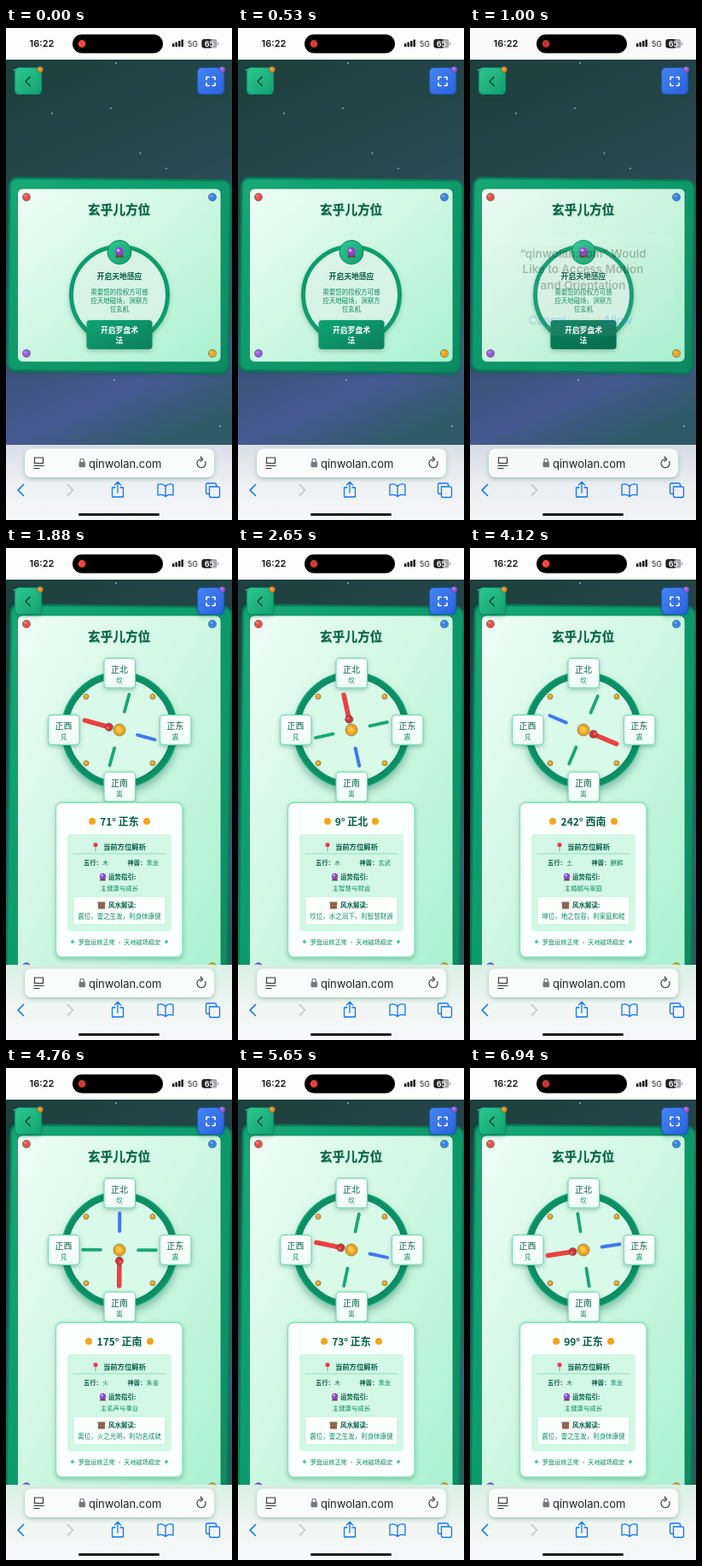
Recreate the animation shown at these times as an HTML page. Size 265 px wide and 576 px high, loop 7.94 s.

```html
<!DOCTYPE html>
<html lang="zh">
<head>
<meta charset="utf-8">
<style>
html, body { margin: 0; width: 100%; height: 100%; overflow: hidden; background: #fdfdfd; }
svg { display: block; width: 100vw; height: 100vh; }
text { font-family: "Noto Sans CJK SC", "Noto Sans CJK", sans-serif; text-anchor: middle; dominant-baseline: central; }
.ui { font-family: Inter, sans-serif; }
.b { font-weight: 700; }
.m { font-weight: 500; }
.l { text-anchor: start; }
.line { fill: none; stroke-linecap: round; stroke-linejoin: round; }
</style>
</head>
<body>
<svg id="stage" viewBox="0 0 265 576" preserveAspectRatio="none">
<defs>
  <linearGradient id="sky" x1=".35" y1="0" x2=".6" y2="1">
    <stop offset="0" stop-color="#1e4140"/><stop offset=".35" stop-color="#28494f"/>
    <stop offset=".6" stop-color="#36506f"/><stop offset=".84" stop-color="#465a92"/><stop offset="1" stop-color="#2f5b68"/>
  </linearGradient>
  <linearGradient id="frame" x1="0" y1="0" x2="1" y2="1">
    <stop offset="0" stop-color="#13a976"/><stop offset="1" stop-color="#088b61"/>
  </linearGradient>
  <linearGradient id="mint" x1="0" y1="0" x2="1" y2="1">
    <stop offset="0" stop-color="#effdf6"/><stop offset=".5" stop-color="#cdf7e1"/><stop offset="1" stop-color="#a9f1d0"/>
  </linearGradient>
  <linearGradient id="tile" x1="0" y1="0" x2="0" y2="1">
    <stop offset="0" stop-color="#fff"/><stop offset="1" stop-color="#effdf6"/>
  </linearGradient>
  <linearGradient id="green" x1="0" y1="0" x2="1" y2="1">
    <stop offset="0" stop-color="#2fc892"/><stop offset="1" stop-color="#12a06f"/>
  </linearGradient>
  <linearGradient id="deep" x1="0" y1="0" x2="1" y2="1">
    <stop offset="0" stop-color="#12a574"/><stop offset="1" stop-color="#0b7e5b"/>
  </linearGradient>
  <linearGradient id="blue" x1="0" y1="0" x2="1" y2="1">
    <stop offset="0" stop-color="#4586f3"/><stop offset="1" stop-color="#2860dc"/>
  </linearGradient>
  <linearGradient id="barA" x1="0" y1="0" x2="0" y2="1">
    <stop offset="0" stop-color="#d9dfe7"/><stop offset=".55" stop-color="#eef1f5"/><stop offset="1" stop-color="#f5f7f9"/>
  </linearGradient>
  <linearGradient id="barB" x1="0" y1="0" x2="0" y2="1">
    <stop offset="0" stop-color="#d8efe5"/><stop offset=".55" stop-color="#f0f6f4"/><stop offset="1" stop-color="#f6f8f9"/>
  </linearGradient>
  <filter id="soft" x="-30%" y="-30%" width="160%" height="170%">
    <feDropShadow dx="0" dy="2" stdDeviation="2.5" flood-color="#064e3b" flood-opacity=".3"/>
  </filter>
  <filter id="wide" x="-30%" y="-30%" width="160%" height="170%">
    <feDropShadow dx="0" dy="6" stdDeviation="5" flood-color="#0b5f46" flood-opacity=".4"/>
  </filter>
</defs>
</svg>
<script>
const svg = document.getElementById('stage');
const ink = '#065f46', leaf = '#0b8a63', orange = '#f7a31c';

const box = (x, y, w, h, r, fill, extra = '') =>
  `<rect x="${x}" y="${y}" width="${w}" height="${h}" rx="${r}" fill="${fill}" ${extra}/>`;
const dot = (x, y, r, fill, extra = '') => `<circle cx="${x}" cy="${y}" r="${r}" fill="${fill}" ${extra}/>`;
const ball = (x, y, r, fill) => dot(x, y, r, fill, 'stroke="#12604b" stroke-opacity=".55" stroke-width=".9"') +
  dot(x - r * .25, y - r * .3, r * .35, '#fff', 'opacity=".3"');
// Chinese glyphs sit slightly below the central baseline, so they are raised
const text = (x, y, size, str, fill = ink, cls = '', extra = '') =>
  `<text x="${x}" y="${cls.includes('ui') ? y : y - .7}" font-size="${size}" fill="${fill}" class="${cls}" ${extra}>${str}</text>`;
const line = (d, color, w = 1.3) => `<path class="line" d="${d}" stroke="${color}" stroke-width="${w}"/>`;
const group = (id, body) => `<g id="${id}">${body}</g>`;

const orb = (x, y, s) => `<g transform="translate(${x} ${y}) scale(${s})">` +
  `<path d="M-3 2H3L4 5H-4Z" fill="#6b4a3a"/>` + dot(0, -.6, 4, '#8b45c9') + dot(-1.2, -1.8, 1.5, '#e3a5f5') + '</g>';

// Tilted green frame with a light panel, corner balls and the title
function card(top, h) {
  const bottom = top + h, mid = top + h / 2;
  const edge = box(3, top - 11, 259, h + 22.5, 9, 'url(#frame)',
    `stroke="#087a56" stroke-width="2.4" filter="url(#soft)" transform="rotate(.7 132 ${mid})"`);
  return edge + box(13.5, top, 238.5, h, 6, 'url(#mint)', 'stroke="#0a8a61" stroke-width=".8"') +
    ball(24, top + 10, 4.6, '#ef4c48') + ball(242, top + 10, 4.6, '#3d82ee') +
    ball(24, bottom - 10, 4.6, '#a159e3') + ball(242, bottom - 10, 4.6, orange) +
    text(133.2, top + 25.2, 14.7, '玄乎儿方位', '#8fcdb2', 'b') + text(132.6, top + 24.2, 14.7, '玄乎儿方位', ink, 'b');
}

function intro() {
  const lines = ['需要您的授权方可感', '应天地磁场，洞察方', '位玄机'];
  return card(188, 203) +
    dot(133, 312.5, 56.5, '#e2faee', 'fill-opacity=".75" stroke="#0e9c6d" stroke-width="5" filter="url(#soft)"') +
    dot(133, 262.5, 14, 'url(#green)', 'stroke="#0a8a61"') + orb(133, 262.5, 1.25) +
    text(133, 291, 8.8, '开启天地感应', ink, 'b') +
    lines.map((s, i) => text(133, 309.3 + i * 9.8, 7.5, s, leaf)).join('') +
    box(94.5, 342, 77, 34, 4, 'url(#deep)', 'filter="url(#soft)"') +
    box(94.5, 342, 77, 34, 4, '#065f46', 'id="press"') +
    text(133, 353.7, 8.8, '开启罗盘术', '#fff', 'b') + text(133, 366.2, 8.8, '法', '#fff', 'b');
}

const tile = (x, y, name, sign) =>
  box(x - 18, y - 17.3, 36.5, 34.6, 4, 'url(#tile)', 'stroke="#74d9b3" stroke-width="1.2" filter="url(#soft)"') +
  text(x, y - 4.5, 10, name, ink, 'm') + text(x, y + 8.5, 7.5, sign, leaf);

const arm = (a, r0, r1, color, w) => `<g transform="rotate(${a})">${line(`M0 ${-r0}V${-r1}`, color, w)}</g>`;

function compass() {
  const corners = [[94, 174], [172, 174], [94, 252], [172, 252]];
  const needle = arm(90, 22, 43, '#19a777', 3.8) + arm(270, 22, 43, '#19a777', 3.8) +
    arm(180, 22, 43, '#3f78ee', 4) + arm(0, 14, 42, '#ec4141', 5.6) + ball(0, -12.7, 4.6, '#d92f35');
  return card(79, 421) +
    dot(133, 213, 64, '#d9f9e9', 'stroke="#0c8e65" stroke-width="8" filter="url(#wide)"') +
    dot(133, 213, 67.5, 'none', 'stroke="#12a979" stroke-width="1.4"') +
    corners.map(([x, y]) => ball(x, y, 3.1, orange)).join('') +
    tile(133, 146.5, '正北', '坎') + tile(198.5, 213, '正东', '震') +
    tile(133, 279.5, '正南', '离') + tile(67.5, 213, '正西', '兑') +
    group('needle', needle) + ball(133, 213, 7, orange) + dot(133, 213, 3, '#ffc94a') + info();
}

function info() {
  return box(58.5, 298, 148.5, 181, 7, '#fbfffd', 'stroke="#80dfba" stroke-width="1.3" filter="url(#soft)"') +
    dot(101, 320, 4, orange, 'id="dotL"') + dot(165, 320, 4, orange, 'id="dotR"') +
    text(133, 320.5, 12, '', ink, 'b', 'id="head"') +
    box(72, 335, 122, 114, 4, '#d3f8e6') +
    line('M105 350V355', '#8b9aa0', 1) + dot(105, 347.5, 2.6, '#e53e4b') +
    text(139, 350, 8.4, '当前方位解析', ink, 'b') + line('M79 358H187', '#7fd9b6', .9) +
    text(91, 369, 7.3, '五行：', ink, 'b l') + text(113, 369, 7.3, '', leaf, 'l', 'id="element"') +
    text(142.5, 369, 7.3, '神兽：', ink, 'b l') + text(164.5, 369, 7.3, '', leaf, 'l', 'id="beast"') +
    orb(113.5, 385, .9) + text(120, 385, 7.5, '运势指引:', ink, 'b l') +
    text(133, 398, 7.4, '', leaf, '', 'id="luck"') +
    box(79, 408, 108, 33, 2, '#fafffc', 'stroke="#b4ecd4" stroke-width=".8"') +
    box(108, 414.5, 8, 8, .5, '#9a5b43') + line('M107.5 415H116.5M108 418.5H116', '#5f8c73', 1) +
    text(120, 418, 7.5, '风水解读:', ink, 'b l') +
    text(133, 431, 7.5, '', leaf, '', 'id="reading"') +
    dot(78, 461, 2, '#4ccb9c') + dot(188, 461, 2, '#4ccb9c') +
    text(133, 461.5, 7.2, '罗盘运转正常 · 天地磁场稳定', leaf);
}

const buttons = () =>
  box(10.5, 46.5, 31, 31, 5, 'url(#green)', 'stroke="#0f9468" stroke-width="1.2" filter="url(#soft)"') +
  line('M28 57.5L23 62.5L28 67.5', '#064e3b', 1.7) + ball(40, 48.5, 3.5, '#f58a1f') +
  box(224.5, 46.5, 31, 31, 5, 'url(#blue)', 'stroke="#2453bd" stroke-width="1.2" filter="url(#soft)"') +
  line('M235 60.5V57.5H238M242 57.5H245V60.5M245 64.5V67.5H242M238 67.5H235V64.5', '#fff', 1.6) +
  ball(253.5, 48.5, 3.5, '#9b57e0');

const status = () => box(0, 0, 265, 37, 0, '#fdfdfd') +
  text(42, 18.3, 11, '16:22', '#111', 'ui', 'font-weight="600"') +
  box(78, 7.5, 106, 22, 11, '#000') + dot(89, 18.5, 4.4, '#f4463c', 'id="rec"') +
  [4, 5.5, 7, 8.5].map((h, i) => box(195 + i * 3.5, 22 - h, 2.5, h, .7, '#111')).join('') +
  text(219, 18.5, 9, '5G', '#222', 'ui') +
  box(229.5, 13, 18, 10.5, 3, '#a9a9ad') + box(229.5, 13, 12, 10.5, 3, '#222') + box(248.3, 16.5, 1.2, 3.5, .6, '#a9a9ad') +
  text(238.5, 18.5, 8.5, '65', '#fff', 'ui b');

const blue = '#0a76f5';
const browser = () => box(0, 488, 265, 88, 0, 'url(#barA)', 'id="bar"') +
  box(22, 492.5, 222, 33.5, 8, '#fafbfb', 'filter="url(#soft)"') +
  line('M33.500 503H43.500V509.500H33.500ZM33 512.5H44M33 515.5H39', '#333', 1.2) +
  box(85.5, 508, 7.5, 6.2, 1.2, '#76797d') + line('M87 508V506.5A2.2 2.2 0 0 1 91.5 506.5V508', '#76797d', 1.2) +
  text(97, 509.5, 13, 'qinwolan.com', '#222', 'ui l') +
  line('M233.5 507.5A5 5 0 1 1 229 504.8M228 502L230.8 504.8L228 507.3', '#333', 1.1) +
  line('M20.5 534.5L14 541L20.5 547.5', blue, 1.6) + line('M72 534.5L78.5 541L72 547.5', '#c2c5ca', 1.6) +
  line('M128 538H124.5V549H137.5V538H134M131 544V531.5M127.5 535L131 531.5L134.5 535', blue) +
  line('M187 536.5C184.5 533.5 181 533.5 178 534.5V547C181 546 184.5 546 187 548.5C189.5 546 193 546 196 547V534.5C193 533.5 189.5 533.5 187 536.5V548', blue) +
  line('M238.5 537H248A2 2 0 0 1 250.5 539V547.5A2 2 0 0 1 248 549.5H240.5A2 2 0 0 1 238.5 547.5ZM238.5 545.5H236.5A2 2 0 0 1 234.5 543.5V535A2 2 0 0 1 236.5 533H244.5A2 2 0 0 1 246.5 535V537', blue) +
  box(85, 568.3, 95, 2.7, 1.35, '#000');

function permission() {
  const title = ['“qinwolan.com” Would', 'Like to Access Motion', 'and Orientation'];
  const panel = box(-91, -51, 182, 102, 9, '#f0f3f1', 'fill-opacity=".95"') + line('M-91 19H91M0 19V51', '#b9bfbd', .5);
  const words = title.map((s, i) => text(0, -32 + i * 16, 11.5, s, '#111', 'ui', 'font-weight="600"')).join('') +
    text(-36, 35, 11.5, 'Cancel', blue, 'ui') + text(35, 35, 11.5, 'Allow', blue, 'ui');
  return group('panel', panel) + group('words', words);
}

const stars = [[54, 100], [235.5, 47.5], [157.5, 146.5], [188, 164.5], [123, 94], [127, 412], [10, 49], [129, 41], [251, 466]];
svg.innerHTML += box(0, 36, 265, 460, 0, 'url(#sky)') +
  stars.map(([x, y]) => dot(x, y, .9, '#b9dcd2', 'opacity=".8"')).join('') +
  group('intro', intro()) + group('compass', compass()) + buttons() + status() + browser() +
  box(0, 0, 265, 576, 0, '#000', 'id="dim"') + group('alert', permission());

const $ = Object.fromEntries([...svg.querySelectorAll('g[id], text[id], rect[id], circle[id]')].map(e => [e.id, e]));

// Eight sectors clockwise from north: name, element, beast, fortune, reading
const sectors = [
  ['正北', '水', '玄武', '主智慧与财运', '坎位，水之润下，利智慧财源'],
  ['东北', '土', '天狗', '主学业与修行', '艮位，山之稳重，利学业修身'],
  ['正东', '木', '青龙', '主健康与成长', '震位，雷之生发，利身体康健'],
  ['东南', '木', '凤凰', '主财富与机遇', '巽位，风之流通，利财运亨通'],
  ['正南', '火', '朱雀', '主名声与事业', '离位，火之光明，利功名成就'],
  ['西南', '土', '麒麟', '主婚姻与家庭', '坤位，地之包容，利家庭和睦'],
  ['正西', '金', '白虎', '主子嗣与喜悦', '兑位，泽之喜悦，利子孙福气'],
  ['西北', '金', '天狼', '主权威与领导', '乾位，天之刚健，利权势地位'],
];

// Unwrapped heading over time: [ms, degrees]
const turn = [[1500, 102], [1880, 71], [3340, -47], [3450, -47], [4760, -185], [5650, -287], [5900, -297], [6650, -261], [6940, -261]];
function heading(t) {
  if (t <= turn[0][0]) return turn[0][1];
  const i = turn.findIndex(k => t <= k[0]);
  const [t0, a] = turn[i - 1], [t1, b] = turn[i];
  return a + (b - a) * (t - t0) / (t1 - t0);
}

const clamp = v => Math.max(0, Math.min(1, v));
const LOOP = 7940, END = 6940, PRESS = 760, OPEN = 1500, LAG = 45;

function draw(now) {
  const t = Math.min(now % LOOP, END);
  const open = t >= OPEN;
  $.intro.style.display = open ? 'none' : '';
  $.compass.style.display = open ? '' : 'none';
  $.bar.setAttribute('fill', open ? 'url(#barB)' : 'url(#barA)');
  $.rec.setAttribute('opacity', .9 + .1 * Math.cos(t / 320));
  $.press.setAttribute('opacity', .5 * clamp((t - PRESS) / 150));

  // The lettering shows before the panel and the dimming behind it
  const rise = clamp((t - 940) / 240), fall = clamp((t - 1440) / 220);
  const shown = rise * (1 - fall);
  $.words.setAttribute('opacity', shown);
  $.panel.setAttribute('opacity', shown * shown);
  $.dim.setAttribute('opacity', .2 * shown * shown);
  $.alert.setAttribute('transform', `translate(132.5 301) scale(${1.22 - .22 * rise})`);

  const deg = ((Math.round(heading(t)) % 360) + 360) % 360;
  const [name, element, beast, luck, reading] = sectors[Math.round(deg / 45) % 8];
  const half = 24 + 4 * String(deg).length;
  $.needle.setAttribute('transform', `translate(133 213) rotate(${-heading(t === END ? t : t - LAG)})`);
  $.dotL.setAttribute('cx', 133 - half);
  $.dotR.setAttribute('cx', 133 + half);
  $.head.textContent = `${deg}° ${name}`;
  $.element.textContent = element;
  $.beast.textContent = beast;
  $.luck.textContent = luck;
  $.reading.textContent = reading;
}

function tick() {
  draw(performance.now());
  requestAnimationFrame(tick);
}
tick();
</script>
</body>
</html>
```
